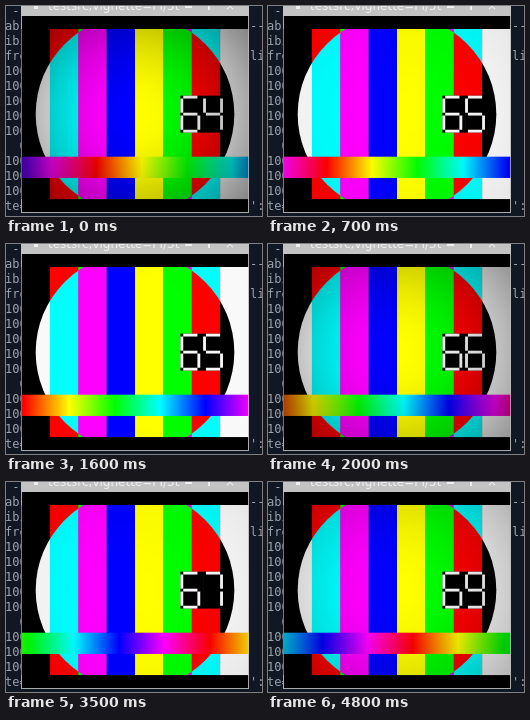
An HTML page with a canvas that plays this animation: 256x210 px, repeating every 4.9 s.

```html
<!DOCTYPE html>
<html lang="en">
<head>
<meta charset="utf-8">
<title>Test pattern with vignette</title>
<style>
  html, body { margin: 0; width: 100%; height: 100%; overflow: hidden; background: #111823; }
  canvas { display: block; }
</style>
</head>
<body>
<canvas id="stage" width="256" height="210"></canvas>
<script>
const ctx = document.getElementById('stage').getContext('2d');
const LOOP = 4900;
const START_SECONDS = 64.35;

// The pattern is laid out on a 320 x 240 grid.
const VIDEO = { x: 15.5, y: 23, w: 320, h: 240, scale: 227 / 320 };
const BARS = ['#000', '#f00', '#0f0', '#ff0', '#00f', '#f0f', '#0ff', '#fafafa'];
const SPECTRUM = ['#f00', '#ff0', '#0f0', '#0ff', '#00f', '#f0f'];

// Times at which the picture is refreshed.
const TICKS = [...Array.from({ length: 21 }, (_, i) => i * 100),
  2200, 2300, 2400, 2500, 3000, 3200, 3500, 3800, 4000, 4100, 4300, 4500, 4800];

// [time, lens angle in radians]
const VIGNETTE = [[0, .55], [100, .5], [400, .04], [700, .2], [1100, .66], [1600, .06],
  [2000, .5], [2500, .04], [3000, .45], [3500, .2], [4000, .5], [4500, .2], [4800, .4]];

// Segments: x, y, w, h
const SEGMENTS = {
  t: [1, 0, 5, 1], m: [1, 6, 5, 1], b: [1, 12, 5, 1],
  l: [0, 1, 1, 5], L: [0, 7, 1, 5], r: [6, 1, 1, 5], R: [6, 7, 1, 5]
};
const DIGITS = ['tblLrR', 'rR', 'tmbLr', 'tmbrR', 'mlrR', 'tmblR', 'tmblLR', 'trR', 'tmblLrR', 'tmblrR'];

function rect(color, x, y, w, h) {
  ctx.fillStyle = color;
  ctx.fillRect(x, y, w, h);
}

function drawTerminal() {
  rect('#111823', 0, 0, 256, 210);
  ctx.font = '12px "DejaVu Sans Mono", monospace';
  ctx.fillStyle = '#9ba3ad';
  const rows = [' -', 'ab', 'ibi', 'fre', '100', '100', '100', '100', '100', '  0', '100', '100', '100', 'te='];
  rows.forEach((row, i) => ctx.fillText(row, -1, 9 + i * 15));
  [['--', 24], ['li', 54], ["':", 204]].forEach(([text, y]) => ctx.fillText(text, 244, y));
}

function drawWindow() {
  rect('#a9a9a9', 15, 0, 228, 207);
  rect('#c3c3c3', 15, 0, 228, 10);
  rect('#000', 16, 10, 226, 196);
  ctx.font = '12px "DejaVu Sans", sans-serif';
  ctx.fillStyle = '#efefef';
  ctx.fillText('testsrc,vignette=PI/5t', 42, 4);
  rect('#efefef', 28, 0, 4, 3);
  rect('#efefef', 179, 0, 7, 2);
  rect('#efefef', 202, 0, 2, 4);
  ctx.fillText('×', 219, 4);
}

function drawBars(inverted) {
  const width = VIDEO.w / BARS.length;
  BARS.forEach((_, i) => rect(BARS[inverted ? 7 - i : i], i * width, 0, width + .3, VIDEO.h));
}

function drawSpectrum(seconds) {
  // One hue step takes one second or 64 grid units.
  const step = 64;
  const origin = -(seconds % 6) * step;
  const gradient = ctx.createLinearGradient(origin, 0, origin + 12 * step, 0);
  for (let i = 0; i <= 12; i++) gradient.addColorStop(i / 12, SPECTRUM[i % 6]);
  rect(gradient, 0, 180, VIDEO.w, 30);
}

function drawDigit(digit, x, y, size) {
  rect('#000', x, y, 8 * size, 13 * size);
  for (const key of DIGITS[digit]) {
    const [sx, sy, w, h] = SEGMENTS[key];
    rect('#fafafa', x + sx * size, y + sy * size, w * size, h * size);
  }
}

function drawCounter(seconds) {
  const text = String(Math.floor(seconds));
  [...text].forEach((d, i) => drawDigit(+d, 288 - (text.length - i) * 32, 94, 4));
}

function angleAt(time) {
  const next = VIGNETTE.findIndex(([t]) => t > time);
  if (next < 0) return VIGNETTE[VIGNETTE.length - 1][1];
  const [t0, a0] = VIGNETTE[next - 1], [t1, a1] = VIGNETTE[next];
  return a0 + (a1 - a0) * (time - t0) / (t1 - t0);
}

function drawVignette(angle) {
  const shade = ctx.createRadialGradient(160, 120, 0, 160, 120, 200);
  for (let d = 0; d <= 1; d += 1 / 16) {
    shade.addColorStop(d, `rgba(0,0,0,${1 - Math.cos(angle * d) ** 4})`);
  }
  rect(shade, 0, 0, VIDEO.w, VIDEO.h);
}

function drawVideo(time) {
  const seconds = START_SECONDS + time / 1000;
  ctx.save();
  ctx.translate(VIDEO.x, VIDEO.y);
  ctx.scale(VIDEO.scale, VIDEO.scale);
  ctx.beginPath();
  ctx.rect(0, 0, VIDEO.w, VIDEO.h);
  ctx.clip();
  drawBars(false);
  ctx.save();
  ctx.beginPath();
  ctx.arc(160, 120, 140, 0, Math.PI * 2);
  ctx.clip();
  drawBars(true);
  ctx.restore();
  drawSpectrum(seconds);
  drawCounter(seconds);
  drawVignette(angleAt(time));
  ctx.restore();
}

let shown = -1;
const began = performance.now();

function frame() {
  const time = (performance.now() - began) % LOOP;
  const tick = TICKS.filter(t => t <= time).pop();
  if (tick !== shown) {
    shown = tick;
    drawTerminal();
    drawWindow();
    drawVideo(tick);
  }
  requestAnimationFrame(frame);
}
frame();
</script>
</body>
</html>
```
